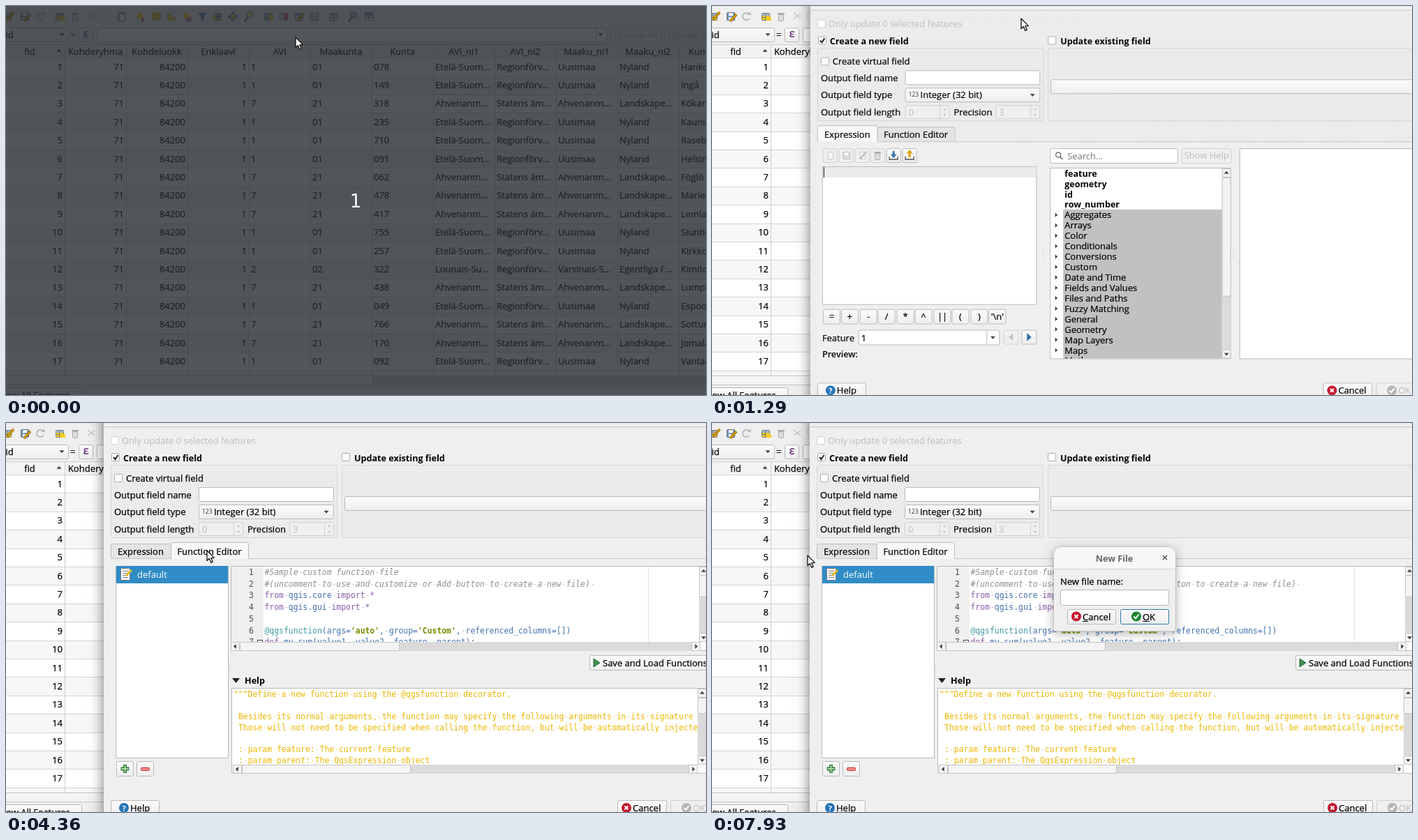
Animation, 1003 px wide and 558 px high, one loop 8000 ms. Source, as an HTML page with a canvas:

```html
<!DOCTYPE html>
<html lang="en">
<head>
<meta charset="utf-8">
<title>Field calculator</title>
<style>
html, body { margin: 0; width: 100%; height: 100%; overflow: hidden; background: #efefef; }
canvas { display: block; }
</style>
</head>
<body>
<canvas id="stage" width="1003" height="558"></canvas>
<script>
const c = document.getElementById('stage').getContext('2d');
const LOOP = 8000, STEP = LOOP / 112;
const UI = '13px "Open Sans", sans-serif';
const BOLD = 'bold 12.6px "Open Sans", sans-serif';
const MONO = '11.4px "DejaVu Sans Mono", monospace';
const BG = '#efefef', EDGE = '#b9b9b9', INK = '#000', FAINT = '#bcbcbc';

// ---- helpers: y of a text is the middle of its line
function text(s, x, y, color = INK, font = UI, align = 'left') {
  const base = Math.round(y + 4.6);
  c.font = font;
  c.fillStyle = c.strokeStyle = color;
  c.textAlign = align;
  c.fillText(s, x, base);
  if (font === UI && color === INK) {
    c.lineWidth = .25;
    c.strokeText(s, x, base);
  }
}
// Code with its spaces marked by small dots; returns where the text ends
function code(s, x, y, color, style = '') {
  c.font = style + MONO;
  c.fillStyle = color;
  c.textAlign = 'left';
  c.fillText(s, x, Math.round(y + 4));
  const advance = c.measureText('0').width;
  [...s].forEach((ch, i) => {
    if (ch === ' ') rect(Math.round(x + i * advance + 3), Math.round(y), 1, 1, color);
  });
  return x + s.length * advance;
}
function rect(x, y, w, h, color) {
  c.fillStyle = color;
  c.fillRect(x, y, w, h);
}
function box(x, y, w, h, fill = '#fff', stroke = EDGE, r = 2) {
  c.beginPath();
  c.roundRect(x + .5, y + .5, w, h, r);
  c.fillStyle = fill;
  c.fill();
  c.strokeStyle = stroke;
  c.lineWidth = 1;
  c.stroke();
}
function disc(x, y, r, color) {
  c.beginPath();
  c.arc(x, y, r, 0, 7);
  c.fillStyle = color;
  c.fill();
}
function poly(points, fill, stroke, width = 1) {
  c.beginPath();
  for (let i = 0; i < points.length; i += 2) c.lineTo(points[i], points[i + 1]);
  if (fill) { c.closePath(); c.fillStyle = fill; c.fill(); }
  if (stroke) { c.strokeStyle = stroke; c.lineWidth = width; c.stroke(); }
}
function arrow(x, y, dir, color = '#444', s = 3.5) {
  c.save();
  c.translate(x, y);
  c.rotate({ right: 0, down: 1, left: 2, up: 3 }[dir] * Math.PI / 2);
  poly([-s / 2, -s, s / 2 + .5, 0, -s / 2, s], color);
  c.restore();
}
function clipped(x, y, w, h, draw) {
  c.save();
  c.beginPath();
  c.rect(x, y, w, h);
  c.clip();
  draw();
  c.restore();
}
function button(x, y, w, h, label = '', color = INK, edge = EDGE) {
  const g = c.createLinearGradient(0, y, 0, y + h);
  g.addColorStop(0, '#fbfbfb');
  g.addColorStop(1, '#efefef');
  box(x, y, w, h, color === FAINT ? BG : g, color === FAINT ? '#d0d0d0' : edge);
  if (label) text(label, x + w / 2 + .5, y + h / 2, color, UI, 'center');
}
function check(x, y, on, edge = '#aaa') {
  box(x, y, 11, 11, '#fff', edge, 1);
  if (on) poly([x + 3, y + 6, x + 5.5, y + 9, x + 9.5, y + 3], null, '#222', 2);
}
function scrollbar(x, y, w, h, from, to) {
  const part = (...area) => box(...area, '#f4f4f4', '#c4c4c4', 0);
  rect(x, y, w, h, '#dadada');
  if (w > h) {
    part(from, y, to - from, h - 1);
    part(x, y, 12, h - 1);
    part(x + w - 13, y, 12, h - 1);
    arrow(x + 6, y + h / 2, 'left');
    arrow(x + w - 6, y + h / 2, 'right');
  } else {
    part(x, from, w - 1, to - from);
    part(x, y, w - 1, 12);
    part(x, y + h - 13, w - 1, 12);
    arrow(x + w / 2, y + 6, 'up');
    arrow(x + w / 2, y + h - 6, 'down');
  }
}
function grip(x, y) {
  for (let i = 0; i < 6; i++) rect(x, y - 8 + i * 3, 1, 1, '#bbb');
}

// ---- toolbar icons, drawn around their centre
const pencil = (x, y, color = '#e0a000') => {
  poly([x - 4, y + 5, x + 5, y - 5], null, '#7a5a10', 3.6);
  poly([x - 4, y + 5, x + 5, y - 5], null, color, 2.2);
};
const sheet = (x, y, fill = '#f7f7f7', edge = '#777') => {
  box(x - 6, y - 5, 11, 10, fill, edge, 1);
  rect(x - 5, y - 4, 10, 3, '#9db7d5');
  rect(x - 5, y + 1, 10, 1, edge);
  rect(x - 1, y - 4, 1, 9, edge);
};
const floppy = (x, y, color) => {
  box(x - 6, y - 6, 11, 11, color, '#666', 1);
  rect(x - 3, y - 5, 6, 4, '#fff');
  rect(x - 3, y + 1, 7, 4, '#eee');
};
const lens = (x, y, fill) => {
  poly([x - 2, y + 2, x - 6, y + 7], null, '#555', 2.4);
  disc(x + 1, y - 2, 5, '#666');
  disc(x + 1, y - 2, 3.7, fill);
};
const yellow = (x, y, mark) => {
  rect(x - 6, y - 5, 8, 8, '#f5d020');
  text(mark, x + 2, y + 3, '#a33', 'bold 10px "Open Sans", sans-serif', 'center');
};
const trash = (x, y) => {
  box(x - 4, y - 3, 7, 9, '#ddd', '#aaa', 1);
  rect(x - 5, y - 5, 10, 2, '#aaa');
};
const page = (x, y, color = '#c8c8c8') => box(x - 4, y - 5, 8, 10, '#f4f4f4', color, 1);

function toolbar(pressed) {
  sheet(2, 15, '#f5d020'); pencil(6, 14);
  floppy(27, 15, '#6d9fc9'); pencil(30, 17);
  c.beginPath(); c.arc(49, 15, 5, .6, 5.6); c.strokeStyle = '#bbb'; c.lineWidth = 2; c.stroke();
  poly([51, 13, 56, 13, 55, 8], '#bbb');
  sheet(77, 15, '#f5d020'); rect(78, 16, 7, 5, '#f5d020');
  trash(99, 15);
  poly([117, 10, 127, 18], null, '#c4c4c4', 1.5);
  poly([117, 18, 127, 11], null, '#c4c4c4', 1.5);
  page(141, 13); page(145, 16);
  box(160, 9, 10, 12, '#b8a98a', '#777', 1); rect(163, 12, 7, 9, '#fff');
  yellow(194, 15, 'ε');
  [10, 14, 18].forEach(y => box(210, y - 1, 11, 3, '#f5d020', '#b89b10', 0));
  poly([232, 20, 232, 10, 243, 20], '#f5d020', '#b89b10'); poly([234, 9, 243, 9, 243, 18], '#fff', '#999');
  yellow(260, 15, '⊘');
  poly([276, 10, 287, 10, 283, 15, 283, 21, 280, 20, 280, 15], '#5b88b5', '#3f668c');
  sheet(303, 15, '#f5d020'); poly([300, 14, 308, 14, 304, 20], '#5b88b5');
  rect(322, 12, 6, 6, '#f5d020');
  ['up', 'down', 'left', 'right'].forEach((d, i) => arrow([325, 325, 320, 330][i], [10, 20, 15, 15][i], d, '#3f76a8', 3.6));
  lens(348, 15, '#f5e58a');
  sheet(376, 15, '#b9d49c'); rect(378, 12, 5, 9, '#f5d020');
  sheet(398, 15); rect(399, 11, 4, 9, '#d44');
  sheet(420, 15); pencil(422, 16);
  if (pressed) box(432, 6, 18, 18, '#d3d3d3', '#aaa');
  box(436, 9, 11, 11, '#f4f4f4', '#666', 0);
  for (let i = 0; i < 9; i++) rect(438 + i % 3 * 3, 11 + (i / 3 | 0) * 3, 2, 2, i % 2 ? '#6d8fb3' : '#777');
  sheet(470, 15, '#e6e6e6');
  lens(497, 15, '#9cc3e6');
  sheet(520, 15); rect(514, 9, 12, 3, '#5b88b5');
}

// ---- attribute table
const HEADS = ['fid', 'Kohderyhma', 'Kohdeluokk', 'Enklaavi', 'AVI', 'Maakunta', 'Kunta', 'AVI_ni1', 'AVI_ni2', 'Maaku_ni1', 'Maaku_ni2', 'Kunta_ni1'];
const REGIONS = {
  U: ['1', '01', 'Etelä-Suom…', 'Regionförv…', 'Uusimaa', 'Nyland'],
  A: ['7', '21', 'Ahvenanm…', 'Statens äm…', 'Ahvenanm…', 'Landskape…'],
  V: ['2', '02', 'Lounais-Su…', 'Regionförv…', 'Varsinais-S…', 'Egentliga F…'],
};
const ROWS = ('U078Hanko U149Ingå A318Kökar U235Kauniainen U710Raseborg U091Helsinki A062Föglö A478Mariehamn ' +
  'A417Lemland U755Siuntio U257Kirkkonummi V322Kimitoön A438Lumparland U049Espoo A766Sottunga A170Jomala ' +
  'U092Vantaa A736Sund').split(' ');

function table(pressed) {
  rect(0, 0, 1003, 558, BG);
  toolbar(pressed);
  button(-20, 31, 109, 20);
  text('fid', -5, 41);
  arrow(80, 41, 'down');
  text('=', 92, 41);
  button(104, 31, 20, 20);
  text('ε', 114.5, 40, '#6a2c7a', '600 16px "Open Sans", sans-serif', 'center');
  box(130, 31, 731, 20);
  rect(845, 32, 1, 19, EDGE);
  arrow(852, 41, 'down');
  button(865, 31, 73, 20, 'Update All', FAINT);
  button(943, 31, 110, 20, ' ', FAINT);
  text('Update Selected', 949, 41, FAINT);

  rect(0, 55, 1003, 19, '#f3f3f3');
  rect(0, 55, 1003, 1, '#d0d0d0');
  HEADS.forEach((h, i) => {
    if (i < 11) text(h, i ? 40 + 88 * i : 34, 65, INK, UI, 'center');
    else text(h, 978, 65);
  });
  arrow(76, 64, 'up', '#444');
  clipped(0, 74, 1003, 456, () => ROWS.forEach((row, i) => {
    const top = 74 + 26.4 * i, y = top + 13;
    const [avi, maakunta, ...names] = REGIONS[row[0]];
    rect(0, Math.round(top), 1003, 27, i % 2 ? '#f7f7f7' : '#fff');
    rect(0, Math.round(top), 1003, 1, '#d3d3d3');
    [i + 1, 71, 84200, 1].forEach((v, k) => text(v, 81 + 88 * k, y, INK, UI, 'right'));
    [avi, maakunta, row.slice(1, 4), ...names, row.slice(4)].forEach((v, k) => text(v, 351 + 88 * k, y));
  }));
  for (let x = 84; x < 1003; x += 88) rect(x, 56, 1, 474, '#cdcdcd');
  rect(0, 530, 1003, 14, '#dadada');
  box(-5, 530, 530, 13, '#f4f4f4', '#c4c4c4', 0);
  button(-40, 547, 148, 22);
  text('Show All Features', -15, 558);
}

// ---- field calculator
const TREE = ['feature', 'geometry', 'id', 'row_number', 'Aggregates', 'Arrays', 'Color', 'Conditionals', 'Conversions', 'Custom',
  'Date and Time', 'Fields and Values', 'Files and Paths', 'Fuzzy Matching', 'General', 'Geometry', 'Map Layers', 'Maps', 'Math'];

function spin(x, w, value) {
  box(x, 142, w, 19, BG, '#cfcfcf');
  rect(x + w - 13, 143, 1, 18, '#cfcfcf');
  arrow(x + w - 6, 148, 'up', FAINT, 2.2);
  arrow(x + w - 6, 156, 'down', FAINT, 2.2);
  text(value, x + 5, 152, FAINT);
}
function tab(x, w, label, active) {
  box(x, active ? 171 : 173, w, active ? 26 : 21, active ? '#f8f8f8' : '#e4e4e4', '#bdbdbd');
  text(label, x + w / 2, 184, INK, UI, 'center');
}
function badge(x, y, color, mark) {
  disc(x, y, 7, color);
  if (mark === 'x') {
    poly([x - 2.5, y - 2.5, x + 2.5, y + 2.5], null, '#fff', 2);
    poly([x - 2.5, y + 2.5, x + 2.5, y - 2.5], null, '#fff', 2);
  } else poly([x - 3.5, y, x - 1, y + 3, x + 3.5, y - 3], null, '#fff', 2);
}

function calculator(onEditor, t) {
  c.save();
  c.shadowColor = 'rgba(0,0,0,.55)';
  c.shadowBlur = 18;
  rect(140, -40, 900, 640, BG);
  c.restore();
  rect(140, 0, 863, 5, '#f0f0f0');
  rect(140, 5, 863, 1, '#c6c6c6');

  check(150, 19, false, '#cfcfcf');
  text('Only update 0 selected features', 166, 25, FAINT);
  box(150, 60, 324, 104, '#ebebeb', '#d6d6d6');
  box(481, 60, 560, 104, '#ebebeb', '#d6d6d6');
  check(151, 43, true);
  text('Create a new field', 168, 50, INK, BOLD);
  check(481, 43, false);
  text('Update existing field', 499, 50, INK, BOLD);
  button(485, 105, 560, 20);
  check(155, 73, false);
  text('Create virtual field', 172, 79);
  text('Output field name', 155, 103);
  box(276, 92, 193, 20);
  text('Output field type', 155, 127);
  button(276, 117, 193, 20);
  text('123', 281, 125, '#333', '8.5px "Open Sans", sans-serif');
  text('Integer (32 bit)', 298, 127);
  arrow(459, 127.5, 'down');
  text('Output field length', 155, 152);
  spin(276, 63, 0);
  text('Precision', 346, 152);
  spin(406, 63, 3);

  tab(150, 86, 'Expression', !onEditor);
  tab(236, 111, 'Function Editor', onEditor);
  rect(149, 194, 860, 380, BG);
  rect(150, 194, 853, 1, '#c6c6c6');
  rect(onEditor ? 237 : 151, 193, onEditor ? 110 : 85, 2, '#f8f8f8');
  if (onEditor) functionPage(t); else expressionPage(t);

  button(150, 541, 69, 22);
  disc(169, 552, 7, '#2474b8');
  text('?', 169, 552, '#fff', 'bold 11px "Open Sans", sans-serif', 'center');
  text('Help', 178, 552);
  button(876, 541, 70, 22);
  badge(889, 552, '#c4162c', 'x');
  text('Cancel', 898, 552);
  button(952, 541, 80, 22, ' ', FAINT);
  badge(975, 552, '#b5b5b5');
  text('OK', 984, 552, FAINT);
}

function expressionPage(t) {
  [158, 181, 204, 226, 249, 272].forEach((x, i) => {
    button(x, 204, 20, 20, ' ', i < 4 ? FAINT : INK);
    const m = x + 10.5;
    if (i === 0) page(m, 214);
    if (i === 1) { box(m - 5, 209, 10, 10, '#ddd', FAINT, 1); rect(m - 2, 210, 5, 4, '#fff'); }
    if (i === 2) { page(m, 214); poly([m - 3, 219, m + 6, 209], null, FAINT, 2.4); }
    if (i === 3) trash(m, 214);
    if (i > 3) {
      const color = i === 4 ? '#3574a8' : '#d9a400';
      poly([m - 6, 216, m - 6, 220, m + 6, 220, m + 6, 216], null, '#666', 1.6);
      rect(m - 1.5, 208, 3, 9, color);
      arrow(m, i === 4 ? 215 : 209, i === 4 ? 'down' : 'up', color, 4.5);
    }
  });
  box(157, 230, 307, 198, '#fff', EDGE, 0);
  rect(158, 231, 306, 15, '#ebebeb');
  if (Math.floor((t - 1095) / 600) % 2 === 0) rect(159, 231, 1, 15, '#111');
  ['=', '+', '-', '/', '*', '^', '||', '(', ')', "'\\n'"].forEach((s, i) => button(Math.round(157.5 + i * 26.5), 435, 24, 21, s));
  text('Feature', 157, 476);
  box(209, 465, 202, 21);
  rect(393, 466, 1, 20, EDGE);
  arrow(402, 476, 'down');
  text('1', 213, 476);
  button(417, 465, 21, 20, ' ', FAINT);
  arrow(428, 475.5, 'left', '#c0c0c0', 5.5);
  button(443, 465, 21, 20);
  arrow(454, 475.5, 'right', '#2f6ea5', 6);
  text('Preview:', 157, 499, INK, '600 12.7px "Open Sans", sans-serif');
  grip(474, 355);

  box(484, 204, 183, 21);
  c.beginPath(); c.arc(496, 213.5, 3.6, 0, 7); c.strokeStyle = '#666'; c.lineWidth = 1.3; c.stroke();
  poly([498.5, 216, 502, 220], null, '#666', 1.5);
  text('Search…', 509, 215.5, '#777');
  button(673, 204, 71, 21, 'Show Help', FAINT);
  box(484, 232, 259, 274, '#fff', EDGE, 0);
  clipped(485, 233, 246, 273, () => {
    rect(503, 292, 229, 220, '#c0c0c0');
    TREE.forEach((s, i) => {
      const y = 240 + i * 14.95;
      text(s, 505, y, INK, i < 4 ? BOLD : UI);
      if (i > 3) arrow(493, y, 'right', '#333', 3);
    });
  });
  scrollbar(731, 233, 13, 273, 246, 416);
  grip(747, 355);
  box(756, 204, 300, 302, '#fff', EDGE, 0);
}

// ---- function editor
const GREY = '#8e908c', VIOLET = '#8959a8', BLUE = '#4271ae', TEAL = '#3e999f', GREEN = '#718c00', GOLD = '#eab700', PLAIN = '#4d4d4c';
const CODE = [
  [['#Sample custom function file', GREY]],
  [['#(uncomment to use and customize or Add button to create a new file) ', GREY]],
  [['from ', VIOLET], ['qgis.core ', BLUE], ['import *', VIOLET]],
  [['from ', VIOLET], ['qgis.gui ', BLUE], ['import *', VIOLET]],
  [],
  [['@qgsfunction', TEAL], ['(args=', BLUE], ["'auto'", GREEN], [', group=', BLUE], ["'Custom'", GREEN], [', referenced_columns=[])', BLUE]],
  [['def ', VIOLET], ['my_sum(value1, value2, feature, parent):', BLUE]],
];
const STYLES = { [GREY]: 'italic ', [GREEN]: 'bold ' };
const HELP = ['"""Define a new function using the @qgsfunction decorator.', '',
  'Besides its normal arguments, the function may specify the following arguments in its signature',
  'Those will not need to be specified when calling the function, but will be automatically injected', '',
  ': param feature: The current feature', ': param parent: The QgsExpression object'];

function functionPage(t) {
  box(157, 205, 161, 275, '#fff', EDGE, 0);
  rect(158, 205, 160, 25, '#308cc6');
  box(164, 208, 13, 17, '#fff', '#777', 1);
  [212, 215, 218, 221].forEach(y => rect(167, y, 8, 1, '#777'));
  poly([172, 219, 180, 211], null, '#e8b820', 3);
  text('default', 188, 217, '#fff');
  button(158, 485, 24, 21, '', INK, t > 6280 && t < 6420 ? '#888' : EDGE);
  for (const [color, inset, width] of [['#2f7d3b', 0, 5], ['#a9d6a5', 1, 2]]) {
    poly([170.5, 490 + inset, 170.5, 502 - inset], null, color, width);
    poly([164.5 + inset, 496, 176.5 - inset, 496], null, color, width);
  }
  button(187, 485, 24, 21);
  box(193, 494, 12, 4, '#f09090', '#c62828', 1);
  grip(320, 355);

  box(322, 205, 700, 121, '#fff', EDGE, 0);
  rect(323, 206, 46, 108, BG);
  rect(920, 206, 1, 108, '#e0e0e0');
  clipped(323, 206, 670, 108, () => CODE.forEach((line, i) => {
    const y = 214 + 16.7 * i;
    code(String(i + 1), 348, y, PLAIN);
    let x = 370.5;
    for (const [s, color] of line) {
      const plain = i === 0 && t < 3780;
      x = code(s, x, y, plain ? PLAIN : color, plain ? '' : STYLES[color]);
    }
    if (i === 6) box(360, 311, 7, 7, '#fff', '#333', 0);
  }));
  scrollbar(993, 206, 13, 108, 218, 249);
  scrollbar(322, 314, 673, 13, 335, 563);
  button(836, 333, 190, 21);
  poly([842, 338, 842, 350, 851, 344], '#3f8f4f', '#2c6d3a');
  text('Save and Load Functions', 855, 344);

  poly([324, 366, 335, 366, 329.5, 373], '#222');
  text('Help', 342, 369, INK, BOLD);
  box(323, 380, 700, 122, '#fff', EDGE, 0);
  clipped(324, 381, 667, 109, () => HELP.forEach((s, i) => code(s, i ? 333 : 326, 389 + 15.85 * i, GOLD)));
  scrollbar(991, 381, 13, 109, 394, 416);
  scrollbar(325, 490, 666, 13, 338, 579);
}

// ---- new file prompt
function accelerated(s, x, y) {
  text(s, x, y);
  rect(x, y + 6, c.measureText(s[0]).width, 1, INK);
}
function prompt(focused, t) {
  c.save();
  c.shadowColor = focused ? 'rgba(0,0,0,.45)' : 'rgba(0,0,0,.3)';
  c.shadowBlur = focused ? 20 : 14;
  c.shadowOffsetY = 3;
  c.beginPath();
  c.roundRect(489, 177, 176, 122, [11, 11, 0, 0]);
  c.fillStyle = BG;
  c.fill();
  c.restore();
  c.beginPath();
  c.roundRect(489.5, 177.5, 175, 32, [11, 11, 0, 0]);
  c.fillStyle = focused ? '#e9e9e9' : '#f7f7f7';
  c.fill();
  c.beginPath();
  c.roundRect(489.5, 177.5, 175, 121, [11, 11, 0, 0]);
  c.strokeStyle = '#c2c2c2';
  c.lineWidth = 1;
  c.stroke();
  rect(490, 209, 175, 1, '#d2d2d2');
  text('New File', 576.5, 194, focused ? '#3a3a3a' : '#666', BOLD, 'center');
  if (focused) disc(649, 193, 9.5, '#d6d6d6');
  poly([646, 190, 652, 196], null, '#444', 1.3);
  poly([646, 196, 652, 190], null, '#444', 1.3);
  text('New file name:', 499, 227);
  box(499, 239, 155, 22, '#fff', focused ? '#2d78a8' : EDGE);
  if (focused && (t < 7000 || t > 7590)) rect(502, 243, 1, 15, '#111');
  button(509, 267, 69, 21);
  badge(522, 277.5, '#c4162c', 'x');
  accelerated('Cancel', 531, 278);
  button(585, 267, 69, 21, '', INK, '#2d78a8');
  badge(608, 277.5, '#1b8530');
  accelerated('OK', 617, 278);
}

// ---- pointer: time, x, y
const PATH = [[0, 415, 45], [71, 418, 44], [571, 443, 18], [1500, 443, 18], [2357, 374, 120], [2500, 374, 120], [2571, 321, 113],
  [3360, 288, 184], [4357, 288, 183], [5140, 172, 473], [5500, 158, 503], [5570, 158, 503], [6000, 168, 496], [6640, 168, 496],
  [6714, 306, 411], [7430, 641, 202], [7500, 641, 202], [7928, 137, 190], [8000, 137, 190]];

function pointer(t) {
  const i = Math.max(1, PATH.findIndex(k => k[0] >= t));
  const [t0, x0, y0] = PATH[i - 1], [t1, x1, y1] = PATH[i];
  const u = (t - t0) / (t1 - t0), e = u * (2 - u);
  return [x0 + (x1 - x0) * e, y0 + (y1 - y0) * e];
}
function overInput(x, y, t) {
  const inside = (l, top, r, b) => x > l && x < r && y > top && y < b;
  if (t < 1200) return t > 60 && inside(131, 31, 861, 52);
  if (inside(276, 92, 470, 112.5)) return true;
  if (t < 6280) return false;
  if (inside(489, 177, 665, 299)) return inside(499, 239, 655, 262);
  return inside(323, 206, 993, 314) || inside(324, 381, 991, 490) && t > 6720;
}
function cursor(t) {
  const [x, y] = pointer(t);
  c.save();
  c.translate(Math.round(x), Math.round(y));
  if (overInput(x, y, t)) {
    for (const [color, w] of [['#fff', 3], ['#111', 1.4]]) {
      poly([-3, -6, 3, -6], null, color, w);
      poly([0, -6, 0, 6], null, color, w);
      poly([-3, 6, 3, 6], null, color, w);
    }
  } else {
    const shape = [0, 0, 0, 14.5, 3.3, 11.5, 5.8, 17.3, 8.2, 16.2, 5.8, 10.6, 10.3, 10.4, 0, 0];
    c.lineJoin = 'round';
    poly(shape, '#fff', '#111', 1.3);
  }
  c.restore();
}

function draw(t) {
  table(t > 780);
  if (t < 60) {
    rect(0, 0, 1003, 558, 'rgba(39,44,51,.8)');
    text('1', 501, 284, '#fff', '26px "DejaVu Sans", sans-serif', 'center');
  }
  if (t > 1200) {
    c.save();
    const opening = t < 1280 ? .94 : t < 1350 ? .998 : 1;
    c.globalAlpha = t < 1280 ? .65 : t < 1350 ? .98 : 1;
    c.translate(595, 260);
    c.scale(opening, opening);
    c.translate(-595, -260);
    calculator(t > 3630, t);
    c.restore();
  }
  if (t > 6280) {
    c.save();
    const grow = Math.min(1, (t - 6215) / 285), eased = grow * (2 - grow), scale = .8 + .2 * eased;
    c.globalAlpha = eased;
    c.translate(577, 238);
    c.scale(scale, scale);
    c.translate(-577, -238);
    prompt(t < 7780, t);
    c.restore();
  }
  cursor(t);
}

function tick() {
  const t = performance.now() % LOOP;
  draw(Math.min(111, Math.floor((t + 5) / STEP)) * STEP);
  requestAnimationFrame(tick);
}
tick();
</script>
</body>
</html>
```
